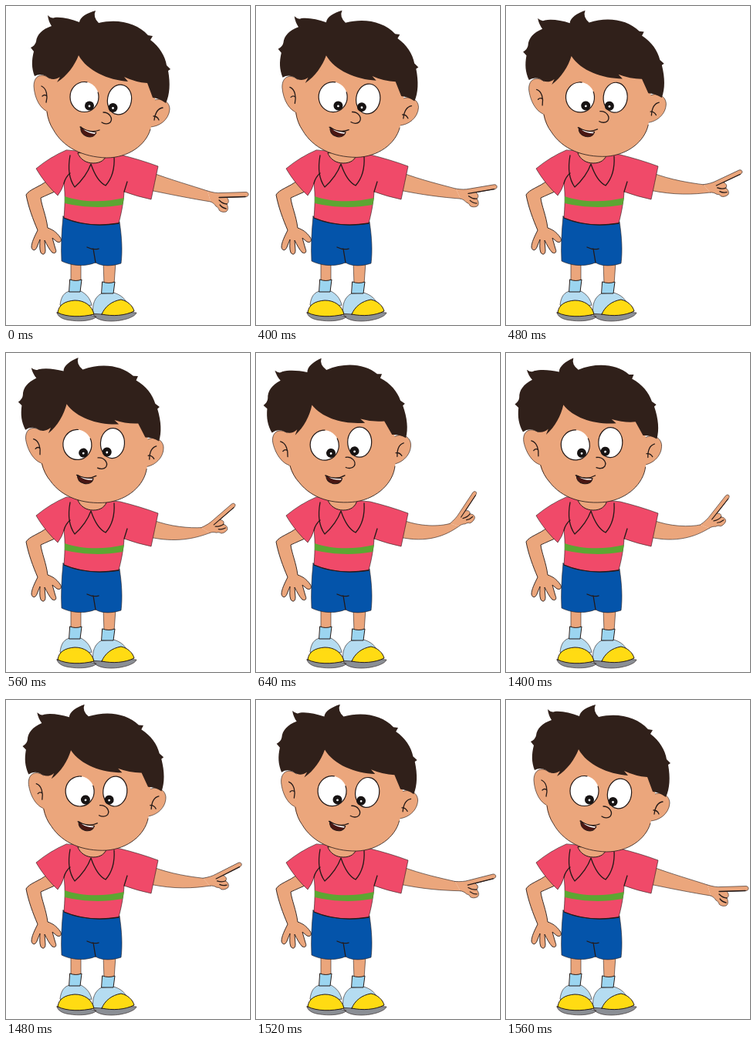
Animation, 316 px wide and 414 px high, one loop 2 s. Source, as an HTML page:

```html
<!DOCTYPE html>
<html lang="en">
<head>
<meta charset="utf-8">
<title>Pointing boy</title>
<style>
  html, body { margin: 0; width: 100%; height: 100%; overflow: hidden; background: #fff; }
  svg { display: block; width: 100vw; height: 100vh; }
  .line { fill: none; stroke-width: 1.3; }
  .skin { fill: #eba67c; }
  .shirt { fill: #f04a69; }
  .shorts { fill: #0454aa; }
  .sock { fill: #9bd5f0; }
  .upper { fill: #b5dcf1; }
  .shoe { fill: #ffdb13; }
  .sole { fill: #8b8f95; }
  .hair { fill: #30201a; }
  .white { fill: #fff; }
</style>
</head>
<body>
<svg viewBox="0 0 316 414" stroke="#251a18" stroke-width=".6" stroke-linecap="round" stroke-linejoin="round">
  <!-- legs and shoes -->
  <path class="skin" d="M84 333V358H97V333M126 333L127 361H140L142 333"/>
  <path class="sole" d="M66 398C80 396 104 400 117 403C114 408 97 410 84 408C73 407 67 403 66 398ZM113 400C128 398 151 397 169 398C167 404 151 409 136 409C124 409 115 406 113 400Z"/>
  <path class="upper" d="M70 388C71 377 76 371 83 370H97C104 374 109 379 111 388ZM113 399C111 388 115 377 124 373L139 372C147 374 152 378 156 384L126 400Z"/>
  <path class="sock" d="M83 355Q90 358 98 355L96 371H82ZM125 358Q133 361 141 358L139 373H124Z" stroke-width="1"/>
  <path class="shoe" d="M67 398C68 388 76 383 89 382C101 382 111 388 114 400C98 404 79 404 67 398ZM124 400C128 390 137 383 149 381C158 383 164 389 166 396C154 402 138 403 124 400Z" stroke-width="1"/>

  <!-- resting arm -->
  <path class="skin" d="M53 227C43 235 30 238 26 245C29 261 35 277 41 291C37 299 33 307 33 313C34 318 38 318 40 313L44 303C44 309 43 315 45 320C48 324 51 322 51 317L50 304C53 310 56 316 60 320C64 322 66 319 64 315L60 301L66 306C71 308 73 304 70 300C65 293 60 290 54 288C52 272 46 259 45 249C52 246 60 242 66 240" stroke-width=".9"/>

  <!-- pointing arm -->
  <path id="arm" class="skin"/>
  <g id="hand">
    <path class="skin" d="M-7 -8C0 -6 5 -5 11 -5.500L43 -6.500C47 -6 47 -1 43 -.5L18 .5C21 4 21 7 18 9C20 13 20 17 17 19C13 20 10 19 8 17C8 15 6 13 4 12C2 9 0 7 -3 6"/>
    <path class="line" d="M42 -.5L8 .5M18 9C13 9 10 6 8 4M17 15Q12 14 9 10"/>
  </g>

  <!-- clothes -->
  <path class="shorts" d="M74 273L147 280C150 300 151 318 149 334C137 338 124 338 116 333C101 339 84 337 72 331C71 313 72 293 74 273Z"/>
  <path class="line" d="M116 333L113 315M105 313Q113 317 120 315"/>
  <path class="shirt" d="M78 187C64 193 51 201 39 211C46 223 56 236 67 246Q73 238 75 230C77 246 76 262 75 275C96 284 122 286 146 282C149 270 152 257 153 241Q169 247 188 251C191 237 194 222 197 208C181 202 164 197 148 193Z"/>
  <path fill="#5da632" stroke="none" d="M76 247C98 255 128 255 153 249L151 258C124 263 97 261 76 256Z"/>
  <path class="line" d="M75 275C96 284 122 286 146 282M75 230Q77 222 83 217M153 241L157 228"/>
  <path class="skin" d="M93 191C96 199 104 204 113 204C122 204 129 200 131 191Z" stroke-width="1"/>
  <path class="line" d="M83 194C80 210 82 225 89 235C99 226 106 216 110 205C114 217 121 229 129 233C137 224 141 211 140 195"/>

  <g id="head">
    <path class="skin" d="M60 98C50 85 36 88 36 104C37 121 45 134 54 137ZM188 124C200 117 212 123 212 134C211 148 198 157 186 157Z"/>
    <path class="skin" stroke="none" d="M58 90C49 116 49 142 61 160C74 184 100 196 130 197C158 197 181 181 187 160C192 146 193 133 193 120L188 94L93 55Z"/>
    <path class="line" d="M53 137C54 146 57 154 61 160C74 184 100 196 130 197C158 197 181 181 187 160" style="stroke-width:.8"/>
    <path class="line" d="M46 104C53 107 54 117 52 125M47 117Q50 114 53 117M203 132C196 133 193 140 192 148M191 143Q196 143 198 148"/>
    <path class="hair" stroke="none" d="M37 91C33 80 33 71 36 59L32 54Q38 51 39 46C40 37 47 30 59 26Q55 20 54 12Q59 17 63 15C73 14 84 17 95 21C96 14 105 9 116 6Q112 14 120 22C145 16 170 22 184 38L190 39L187 44C199 53 206 65 208 77L213 82L210 84C213 101 212 115 207 126Q199 120 190 119L183 100Q168 99 153 92L158 98C132 96 105 84 94 64C89 77 79 91 66 99L70 92C63 97 56 95 52 91Q44 87 37 91Z"/>
    <g class="white" stroke-width="1.2">
      <ellipse cx="101.500" cy="118" rx="18.500" ry="19.500" pathLength="100" stroke-dasharray="78 17 5 0"/>
      <ellipse cx="147" cy="121.500" rx="15.500" ry="19.500" transform="rotate(10 147 121.500)"/>
    </g>
    <g fill="#171313" stroke="none">
      <circle cx="108" cy="129.500" r="6"/><circle cx="138.500" cy="132" r="6"/>
    </g>
    <g class="white" stroke="none">
      <circle cx="108" cy="130" r="1.400"/><circle cx="138.500" cy="132.500" r="1.400"/>
    </g>
    <path class="skin" stroke="none" d="M124 140C132 135 139 145 135 151C131 155 126 154 123 151Z"/>
    <path class="line" d="M126 138C134 138 139 146 135 151C132 154 127 153 124 151"/>
    <path fill="#4a1713" d="M97 157C102 161 109 164 117 164C115 170 109 171 104 169C99 167 96 163 97 157Z" stroke-width="1"/>
    <path class="line" d="M96 157C102 161 111 165 121 161"/>
    <path class="white" stroke="none" d="M100 160Q108 164 116 164.500L115 166Q106 165 100 160Z"/>
  </g>
</svg>
<script>
  const [head, arm, hand] = ["head", "arm", "hand"].map(id => document.getElementById(id));
  const LOOP = 2000, STEP = 40;
  const mix = (a, b, p) => a + (b - a) * p;

  // 0 = pointing sideways, 1 = pointing up; each sweep moves in equal steps.
  function raisedAmount(t) {
    const stepsSince = start => Math.floor((t - start) / STEP) + 1;
    if (t < 400) return 0;
    if (t < 1400) return Math.min(1, stepsSince(400) / 8);
    return Math.max(0, 1 - stepsSince(1400) / 5);
  }

  function pose(p) {
    const angle = -63 * p, rad = angle * Math.PI / 180;
    const x = mix(268, 259.6, p), y = mix(248, 215.3, p);
    const squash = mix(1, 0.8, p);
    const onHand = (dx, dy) => [
      x + dx * Math.cos(rad) - dy * squash * Math.sin(rad),
      y + dx * Math.sin(rad) + dy * squash * Math.cos(rad)
    ];
    const between = (x0, y0, x1, y1) => [mix(x0, x1, p), mix(y0, y1, p)];

    head.setAttribute("transform", `rotate(${-10.8 * p} 105 196)`);
    hand.setAttribute("transform", `translate(${x} ${y}) rotate(${angle}) scale(1 ${squash})`);
    // The outline stays open at the wrist, where the hand continues it.
    arm.setAttribute("d", `M${onHand(-3, 6)}
      C${between(240, 250, 246, 236)} ${between(215, 245, 222, 247)} 186 239
      L188 216
      C${between(215, 226, 212, 226)} ${between(240, 233, 238, 224)} ${onHand(-7, -8)}`);
  }

  function frame(now) {
    pose(raisedAmount(now % LOOP));
    requestAnimationFrame(frame);
  }
  frame(performance.now());
</script>
</body>
</html>
```
